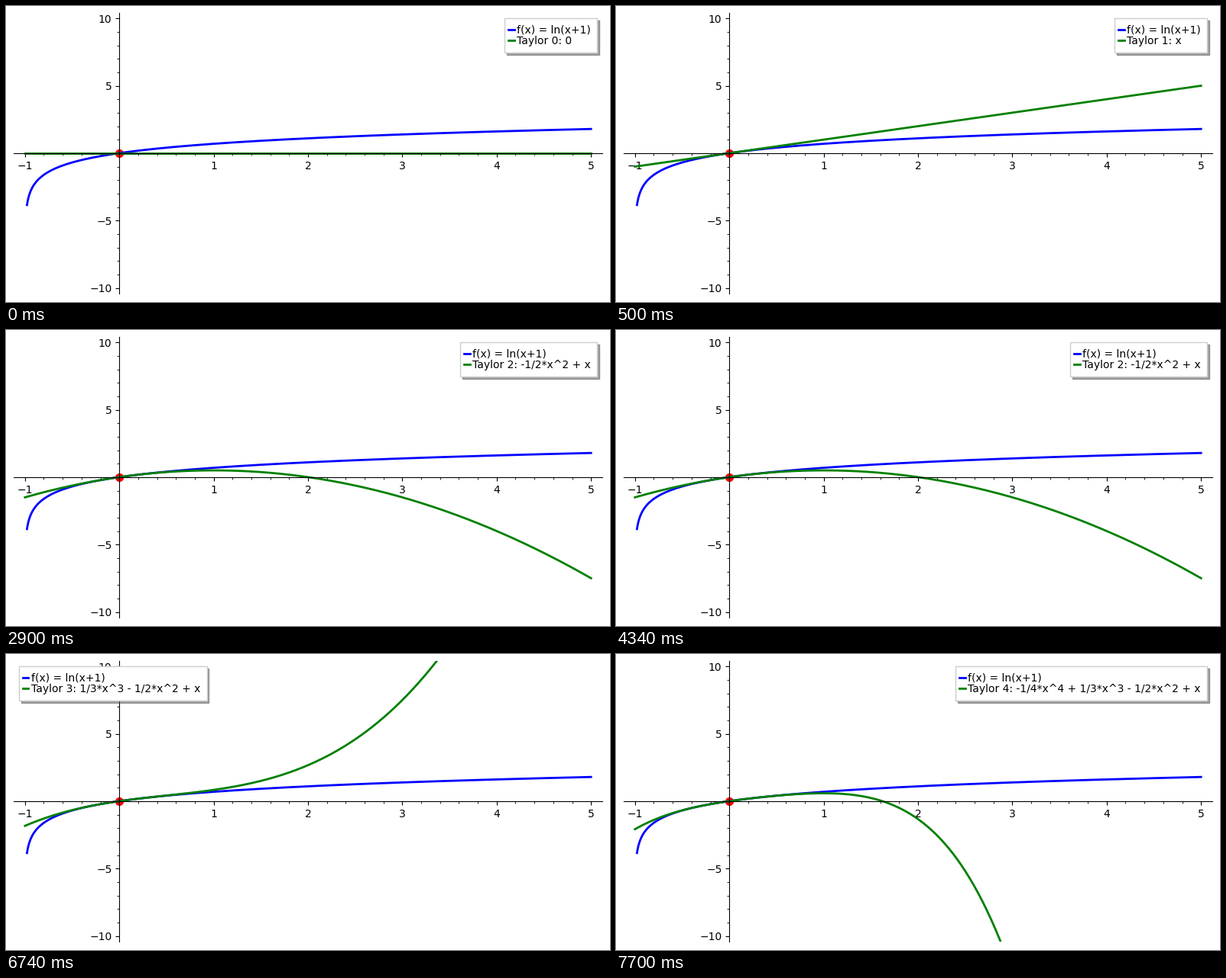
A matplotlib script for the animation above (8 s loop, 790 px wide and 388 px high).

```python
import numpy as np
import matplotlib.pyplot as plt
from matplotlib.animation import FuncAnimation
from matplotlib.ticker import MultipleLocator

W, H, DPI = 790, 388, 100
LEFT, RIGHT, TOP, BOTTOM = 10, 780, 9.1, 376.6
STEP = 100                            # ms per frame
FRAMES = 80
SWITCHES = (500, 2900, 5300, 7700)    # ms at which the degree goes up

plt.rcParams["font.family"] = "DejaVu Sans"
plt.rcParams["font.size"] = 10

fig = plt.figure(figsize=(W / DPI, H / DPI), dpi=DPI, facecolor="white")
ax = fig.add_axes([LEFT / W, 1 - BOTTOM / H, (RIGHT - LEFT) / W, (BOTTOM - TOP) / H])
ax.set_xlim(-1.12, 5.12)
ax.set_ylim(-10.4, 10.4)

# Axes cross at the origin, which carries no label
for side in ("left", "bottom"):
    ax.spines[side].set_position("zero")
for side in ("right", "top"):
    ax.spines[side].set_visible(False)
ax.set_xticks([-1, 1, 2, 3, 4, 5])
ax.set_yticks([-10, -5, 5, 10])
ax.xaxis.set_minor_locator(MultipleLocator(0.2))
ax.yaxis.set_minor_locator(MultipleLocator(1))


def taylor(x, degree):
    """Taylor polynomial of ln(x+1) around 0."""
    return sum(((-1) ** (k + 1) * x**k / k for k in range(1, degree + 1)), np.zeros_like(x))


def formula(degree):
    """The polynomial as text, highest power first."""
    text = ""
    for k in range(degree, 0, -1):
        term = "x" if k == 1 else f"1/{k}*x^{k}"
        negative = k % 2 == 0
        if text:
            text += (" - " if negative else " + ") + term
        else:
            text = "-" + term if negative else term
    return text or "0"


# Sample the logarithm densely where it is steep
x_log = np.geomspace(0.0213, 6, 400) - 1
x_poly = np.linspace(-1, 5, 400)

ax.scatter([0], [0], s=50, c="red", zorder=0)
ax.plot(x_log, np.log(x_log + 1), color="blue", lw=2, label="f(x) = ln(x+1)")
curve, = ax.plot(x_poly, taylor(x_poly, 0), color="green", lw=2)


def update(frame):
    degree = sum(frame * STEP >= t for t in SWITCHES)
    curve.set_ydata(taylor(x_poly, degree))
    curve.set_label(f"Taylor {degree}: {formula(degree)}")
    # The legend sits in the corner that the curve leaves free
    ax.legend(loc="upper left" if degree == 3 else "upper right",
              borderpad=0.6, handlelength=0.05, handletextpad=0.5,
              labelspacing=0.02, numpoints=2, fancybox=False, shadow=True,
              facecolor="white")
    return curve,


anim = FuncAnimation(fig, update, frames=FRAMES, interval=STEP, repeat=True, repeat_delay=0)
plt.show()
```
